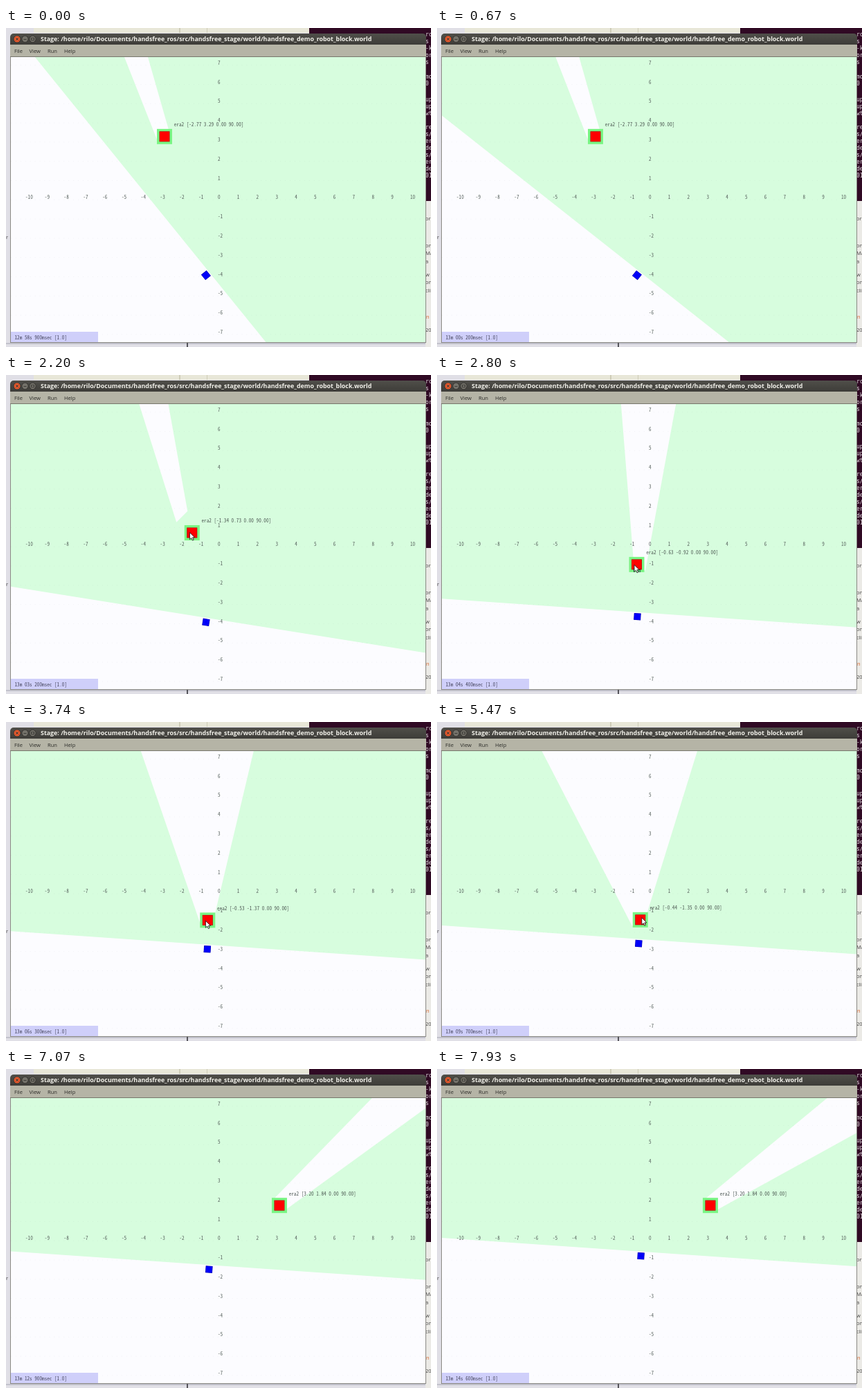
These frames come from a looping animation (614x461 px, 8000 ms). An HTML page with a canvas:

```html
<!DOCTYPE html>
<html>
<head>
<meta charset="utf-8">
<style>
html, body { margin: 0; width: 614px; height: 461px; overflow: hidden; background: #e4e3ee; }
canvas { display: block; }
</style>
</head>
<body>
<canvas id="stage" width="614" height="461"></canvas>
<script>
const ctx = document.getElementById('stage').getContext('2d');
const LOOP = 8000, STEP = 200 / 3;
const ORIGIN = { x: 306, y: 248.3 }, UNIT = 27.8;
const VIEW = { x: 7, y: 42, w: 599, h: 412 };
const UI = '"Open Sans", sans-serif';
const MONO = '"Noto Sans Mono CJK SC", "Noto Sans Mono CJK JP", "Noto Sans Mono", monospace';
const SCAN_LAG = 140, SCAN_SHIFT = -1.5, SCAN_HALF = 8;

// Font size that gives the small labels their 3.6 px pitch.
ctx.font = '100px ' + MONO;
const LABEL = `${360 / ctx.measureText('0').width}px ${MONO}`;

// [ms, world x, world y]
const blockKeys = [
  [1600, -2.77, 3.29], [2650, -0.41, -0.93], [2800, -0.63, -0.92],
  [3150, -0.53, -1.37], [5400, -0.53, -1.37], [5466, -0.44, -1.35], [6000, 3.2, 1.84]
];
// [ms, pointer offset from the block in px]
const pointerKeys = [
  [1000, 60, 60], [1400, -3, -2], [2700, -3.5, 0.5], [4470, -2.5, 1],
  [5210, 2, -3], [5500, 2, -3], [5700, -3, -1], [6300, -3, -1], [6700, 60, 80]
];

const clamp = (v, a, b) => Math.min(b, Math.max(a, v));
const smooth = k => k * k * (3 - 2 * k);

function track(keys, t) {
  if (t <= keys[0][0]) return keys[0].slice(1);
  for (let i = 1; i < keys.length; i++) {
    const a = keys[i - 1], b = keys[i];
    if (t < b[0]) {
      const k = smooth((t - a[0]) / (b[0] - a[0]));
      return [a[1] + (b[1] - a[1]) * k, a[2] + (b[2] - a[2]) * k];
    }
  }
  return keys[keys.length - 1].slice(1);
}

const toScreen = ([x, y]) => ({ x: ORIGIN.x + x * UNIT, y: ORIGIN.y - y * UNIT });

function rect(color, x, y, w, h) {
  ctx.fillStyle = color;
  ctx.fillRect(x, y, w, h);
}

function text(str, x, y, font, color) {
  ctx.font = font;
  ctx.fillStyle = color;
  ctx.fillText(str, x, y);
}

function poly(color, points) {
  ctx.beginPath();
  points.forEach(p => ctx.lineTo(p.x, p.y));
  ctx.closePath();
  ctx.fillStyle = color;
  ctx.fill();
}

function dot(color, x, y, r) {
  ctx.beginPath();
  ctx.arc(x, y, r, 0, Math.PI * 2);
  ctx.fillStyle = color;
  ctx.fill();
}

function drawDesktop() {
  rect('#e0dfe6', 0, 0, 614, 461);
  rect('#e8e7d8', 40, 0, 398, 7);
  rect('#cfcdb8', 250, 0, 2, 7);
  rect('#cfcdb8', 290, 0, 1, 7);
  rect('#c2c2cc', 0, 455, 614, 2);
  rect('#55545a', 261, 455, 2, 6);
  rect('#300a24', 438, 0, 176, 250);
  rect('#ebeae6', 606, 250, 8, 211);
  const shell = [['rc', 12], ['s', 22], ['-k', 32], ['or', 42], ['s', 52], ['mo', 73], ['0', 83],
    ['up', 106], ['up', 116], ['wt', 126], ['re', 146], ['s/', 156], ['er', 166], ['de', 176],
    ['s/', 186], ['er', 196], ['de', 206], ['01', 216]];
  for (const [s, y] of shell) text(s, 606, y, '8px "DejaVu Sans Mono", monospace', '#e4dfe2');
  const page = [['or', 278], ['on', 317], ['Ma', 328], ['a', 340], ['w', 359], ['on', 370], ['cli', 382], ['20', 439]];
  for (const [s, y] of page) text(s, 606, y, '7.5px ' + UI, '#444');
  text('n', 607, 420, '7.5px ' + UI, '#d9652b');
  text('r', 0, 305, '7.5px ' + UI, '#444');
}

function drawFrame() {
  const bar = ctx.createLinearGradient(0, 8, 0, 25);
  bar.addColorStop(0, '#504f4a');
  bar.addColorStop(1, '#3c3b37');
  ctx.fillStyle = bar;
  ctx.beginPath();
  ctx.roundRect(6, 8, 601, 17, [5, 5, 0, 0]);
  ctx.fill();
  rect('#b5b4a6', 6, 24, 601, 18);
  rect('#77766c', 6, 41, 601, 1);
  rect('#8a8984', 6, 42, 601, 413);
  dot('#33322e', 16, 16, 5.2);
  dot('#e6582c', 16, 16, 4.5);
  for (const x of [27.5, 38.5]) {
    dot('#33322e', x, 16, 5);
    dot('#74726a', x, 16, 4.2);
  }
  ctx.strokeStyle = '#3c3b37';
  ctx.lineWidth = 1;
  ctx.beginPath();
  ctx.moveTo(14, 14); ctx.lineTo(18, 18);
  ctx.moveTo(18, 14); ctx.lineTo(14, 18);
  ctx.moveTo(25.5, 16.5); ctx.lineTo(29.5, 16.5);
  ctx.stroke();
  ctx.strokeRect(36.5, 14.5, 4, 3);
  text('Stage: /home/rilo/Documents/handsfree_ros/src/handsfree_stage/world/handsfree_demo_robot_block.world',
    50, 19, 'bold 8.87px ' + UI, '#f2f1ea');
  [['File', 12], ['View', 33.5], ['Run', 60], ['Help', 84]].forEach(([s, x]) =>
    text(s, x, 35.5, '7.6px ' + UI, '#2b2b28'));
}

// Pose of the blue robot: turn on the spot, drive, wait, drive on.
function robotPose(t) {
  const angle = (51 - 19.05 * clamp(t / 1000, 0, 2.47)) * Math.PI / 180;
  const driven = 0.0225 * (clamp(t, 2440, 4095) - 2440 + clamp(t, 5710, LOOP) - 5710);
  return { x: 288.9 + 0.065 * driven, y: 357.3 - 0.998 * driven, angle };
}

function drawScan(robot, block) {
  const u = { x: Math.cos(robot.angle), y: Math.sin(robot.angle) };
  const n = { x: u.y, y: -u.x };
  const eye = { x: robot.x + 6.4 * n.x, y: robot.y + 6.4 * n.y };
  const at = (a, b) => ({ x: eye.x + a * u.x + b * n.x, y: eye.y + a * u.y + b * n.y });
  poly('#d7fdde', [at(-1500, 0), at(1500, 0), at(1500, 1500), at(-1500, 1500)]);

  const corners = [[-1, -1], [1, -1], [1, 1], [-1, 1]].map(([sx, sy]) => {
    const p = { x: block.x + SCAN_SHIFT + sx * SCAN_HALF, y: block.y + sy * SCAN_HALF };
    const dx = p.x - eye.x, dy = p.y - eye.y;
    p.bearing = Math.atan2(dx * u.x + dy * u.y, dx * n.x + dy * n.y);
    return p;
  }).sort((a, b) => a.bearing - b.bearing);
  const far = p => ({ x: eye.x + (p.x - eye.x) * 80, y: eye.y + (p.y - eye.y) * 80 });
  const left = corners[0], right = corners[3];
  poly('#fcfcff', [left, far(left), far(right), right]);
}

function drawGrid() {
  ctx.strokeStyle = 'rgba(90,90,110,0.13)';
  ctx.lineWidth = 0.7;
  ctx.setLineDash([0.7, 6.25]);
  ctx.beginPath();
  for (let i = -7; i <= 7; i++) {
    const y = ORIGIN.y - i * UNIT;
    ctx.moveTo(VIEW.x, y);
    ctx.lineTo(VIEW.x + VIEW.w, y);
  }
  ctx.stroke();
  ctx.setLineDash([]);
  for (let i = -10; i <= 10; i++) {
    const p = toScreen([i, 0]);
    text(i, p.x, p.y - 1, LABEL, '#56605c');
    if (i && Math.abs(i) <= 7) text(i, ORIGIN.x, ORIGIN.y - i * UNIT - 1, LABEL, '#56605c');
  }
}

function drawBlock(block, pose) {
  rect('#7af584', block.x - 11, block.y - 11, 22, 22);
  rect('#a00808', block.x - 7.5, block.y - 7.5, 15, 15);
  rect('#ff0000', block.x - 7, block.y - 7, 14, 14);
  const [x, y] = pose.map(v => v.toFixed(2));
  text(`era2 [${x} ${y} 0.00 90.00]`, block.x + 13.7, block.y - 14.5, LABEL, '#4a5550');
}

function drawRobot(robot) {
  ctx.save();
  ctx.translate(robot.x, robot.y);
  ctx.rotate(robot.angle);
  rect('#0000a8', -5, -5, 10, 10);
  rect('#0000f8', -4.5, -4.5, 9, 9);
  ctx.restore();
}

function drawPointer(x, y) {
  const shape = [[0, 0], [0, 10], [2.4, 7.9], [4, 11.4], [5.7, 10.6], [4.1, 7.2], [7.2, 7.2]];
  poly('#fff', shape.map(([dx, dy]) => ({ x: x + dx, y: y + dy })));
  ctx.strokeStyle = '#111';
  ctx.lineWidth = 0.8;
  ctx.stroke();
}

function draw(t) {
  const pose = track(blockKeys, t);
  const block = toScreen(pose);
  const robot = robotPose(t);

  drawDesktop();
  drawFrame();

  ctx.save();
  ctx.beginPath();
  ctx.rect(VIEW.x, VIEW.y, VIEW.w, VIEW.h);
  ctx.clip();
  rect('#fcfcff', VIEW.x, VIEW.y, VIEW.w, VIEW.h);
  drawScan(robot, toScreen(track(blockKeys, t - SCAN_LAG)));
  drawGrid();
  drawBlock(block, pose);
  drawRobot(robot);
  if (t > 2700 && t < 2950) text('Fid', block.x - 5, block.y + 11, LABEL, '#123');

  rect('#cfcffa', 7, 439, 126, 15);
  const tenths = Math.floor(7789.12 + t * 0.0198);
  const two = v => String(v).padStart(2, '0');
  const secs = Math.floor(tenths / 10);
  const ms = String(tenths % 10 * 100).padStart(3, '0');
  text(`${two(Math.floor(secs / 60))}m ${two(secs % 60)}s ${ms}msec [1.0]`, 12.5, 450, LABEL, '#44445c');
  ctx.restore();

  if (t > 1000 && t < 6700) {
    const [dx, dy] = track(pointerKeys, t);
    drawPointer(block.x + dx, block.y + dy);
  }
}

function tick() {
  const t = performance.now() % LOOP;
  draw(Math.floor((t + 4) / STEP) * STEP);
  requestAnimationFrame(tick);
}
tick();
</script>
</body>
</html>
```
